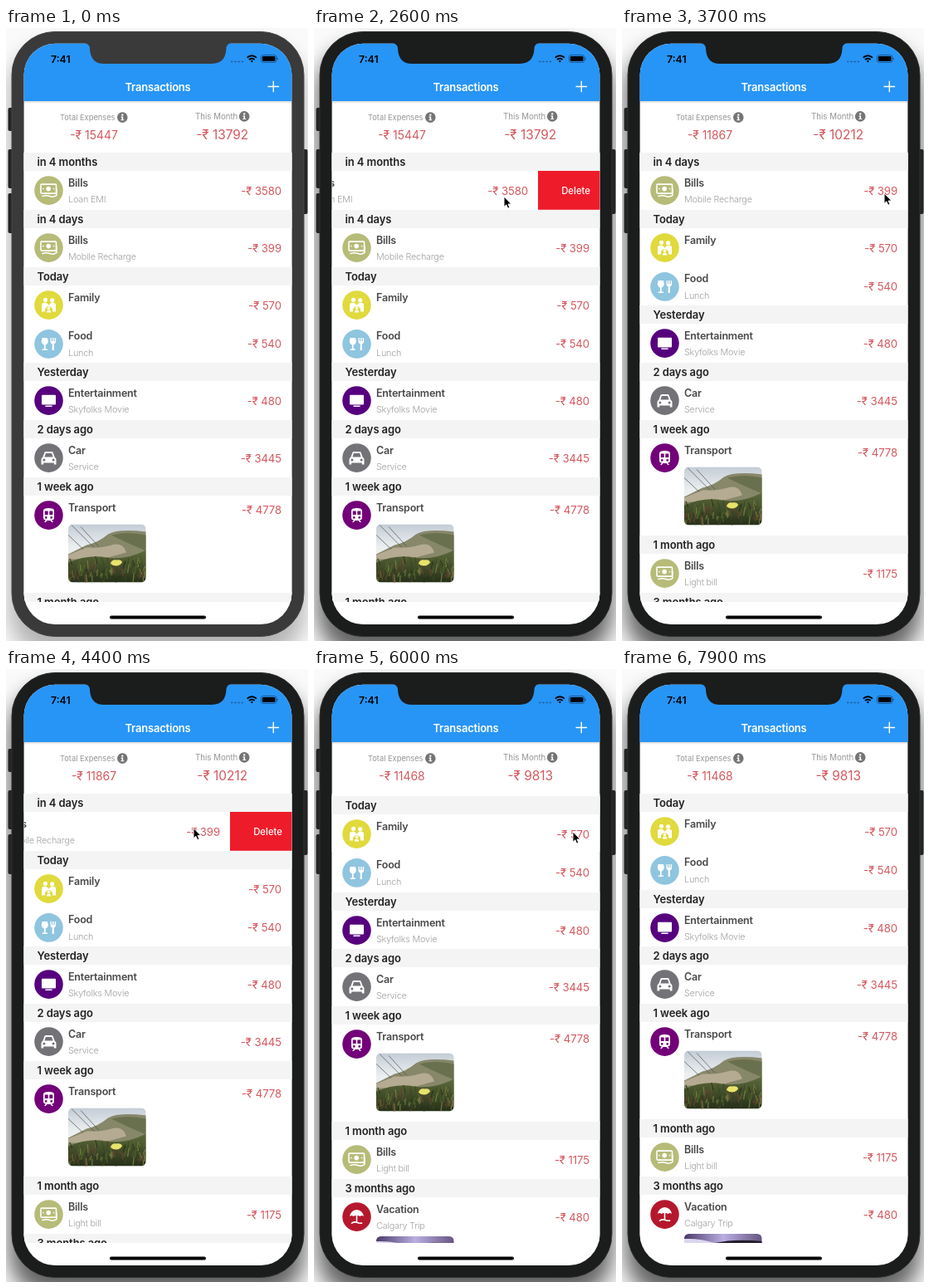
Recreate the animation shown at these times as an HTML page. Size 364x738 px, loop 8000 ms.

```html
<!DOCTYPE html>
<html lang="en">
<head>
<meta charset="utf-8">
<title>Transactions</title>
<style>
  html, body { margin: 0; width: 100%; height: 100%; overflow: hidden; background: #fafafa; }
  svg { display: block; width: 364px; height: 738px; font-family: Inter, Roboto, sans-serif; }
  .head { font-size: 13px; font-weight: 600; letter-spacing: -.1px; fill: #222; }
  .title { font-size: 12.5px; font-weight: 600; letter-spacing: -.2px; fill: #484848; }
  .sub { font-size: 10.8px; font-weight: 300; letter-spacing: -.2px; fill: #a0a0a0; }
  .amount { font-size: 13.2px; letter-spacing: -.1px; fill: #d4585f; text-anchor: end; }
  .total { fill: #d4585f; text-anchor: middle; }
  .label { fill: #959595; }
  .line { fill: none; stroke: #fff; stroke-width: 1.6; stroke-linecap: round; stroke-linejoin: round; }
</style>
</head>
<body>
<svg viewBox="0 0 364 738">
  <defs>
    <filter id="blur" x="-20%" y="-20%" width="140%" height="140%"><feGaussianBlur stdDeviation="13"/></filter>
    <clipPath id="listClip"><rect x="21" y="150" width="324" height="541"/></clipPath>
    <clipPath id="screenClip"><rect x="21.6" y="18.800" width="322.800" height="699.200" rx="37.500"/></clipPath>
    <clipPath id="photoClip"><rect width="93.5" height="70" rx="5.5"/></clipPath>
    <linearGradient id="sky" x2="0" y2="1"><stop stop-color="#c3ccd6"/><stop offset=".4" stop-color="#eceff0"/></linearGradient>
    <linearGradient id="grass" x2="0" y2="1"><stop stop-color="#5d6a3a"/><stop offset="1" stop-color="#27301a"/></linearGradient>
    <linearGradient id="dusk"><stop stop-color="#4a3a68"/><stop offset=".5" stop-color="#b9aee2"/><stop offset="1" stop-color="#66557f"/></linearGradient>
    <linearGradient id="edge" x2="0" y2="1"><stop stop-color="#000" stop-opacity=".16"/><stop offset="1" stop-color="#000" stop-opacity="0"/></linearGradient>
  </defs>

  <rect width="364" height="738" fill="#fafafa"/>
  <rect id="shadow" x="4" y="22" width="356" height="736" rx="54" filter="url(#blur)"/>
  <g fill="#242424">
    <rect x="2.5" y="96" width="8" height="28" rx="2"/>
    <rect x="2.5" y="146" width="8" height="47" rx="2"/>
    <rect x="2.5" y="199" width="8" height="48" rx="2"/>
    <rect x="355" y="146" width="8.5" height="78" rx="2"/>
  </g>
  <rect id="body" x="7" y="4.500" width="352" height="728" rx="52" stroke-width="1"/>

  <g clip-path="url(#screenClip)">
    <rect x="21" y="18" width="324" height="701" fill="#fff"/>
    <g id="list" clip-path="url(#listClip)"></g>
    <rect x="21" y="88" width="324" height="3" fill="url(#edge)"/>
    <rect x="21" y="18" width="324" height="70" fill="#2795f6"/>
    <text x="183" y="75.6" text-anchor="middle" font-size="13" font-weight="600" letter-spacing="-.2" fill="#fff">Transactions</text>
    <path d="M315.5 70.5h13.6M322.3 63.7v13.6" stroke="#fff" stroke-width="1.4"/>

    <text x="54" y="41.6" font-size="12.3" font-weight="600">7:41</text>
    <path d="M271 40.5h15" stroke="#1c5f9d" stroke-width="1.6" stroke-dasharray="2.4 1.8"/>
    <path d="M290.7 35.6q5.6-4.800 11.2 0M292.9 38.1q3.4-2.800 6.800 0" fill="none" stroke="#000" stroke-width="1.9"/>
    <path d="M294.7 39.6q1.6-1.1 3.2 0l-1.6 1.8z"/>
    <rect x="307.5" y="32.6" width="18.4" height="8.8" rx="2.5" fill="none" stroke="#174f84" stroke-width=".9"/>
    <rect x="308.9" y="34" width="15.6" height="6" rx="1.3"/>
    <path d="M326.8 35.4q1.5 1.6 0 3.2z"/>

    <text class="label" x="65" y="110.6" font-size="9.3">Total Expenses</text>
    <text class="label" x="228" y="109.7" font-size="9.7">This Month</text>
    <g id="infos"></g>
    <text id="total" class="total" x="106" y="134.4" font-size="13.9"></text>
    <text id="month" class="total" x="260.7" y="134.2" font-size="15.4"></text>
    <rect x="125" y="707.4" width="116" height="4" rx="2"/>
  </g>
  <path id="notch" d="M95 18H271Q265.5 19.5 265.5 25Q264.5 43 248 43H118Q102 43 101 25Q101 19.5 95 18Z"/>
  <path id="cursor" d="M0 0V12.4L2.8 9.8L4.7 14.2L6.9 13.2L5 9H8.9Z" fill="#000" stroke="#fff" stroke-width="1" stroke-linejoin="round"/>
</svg>

<script>
const LOOP = 8000, LEFT = 21, WIDTH = 323, RIGHT = LEFT + WIDTH, TOP = 150;
const HEAD = 22, ROW = 46.8, SECTION = HEAD + ROW, SWIPE = 74;
const $ = id => document.getElementById(id);

const icons = {
  bills: ['#b6bb78', `<g class="line"><rect x="-9.5" y="-7.500" width="18.5" height="11" rx="1"/>
    <path d="M-7.5 6.800q5-1.4 9 .2t8-1.2V-2"/></g><circle cx="-.3" cy="-2" r="2.8" fill="#fff"/>
    <path class="line" d="M-6.6-2h.1M6-2h.1"/>`],
  family: ['#e0da3d', `<g fill="#fff"><circle cx="-4" cy="-6.3" r="2.6"/><circle cx="4.2" cy="-5.800" r="2.6"/>
    <path d="M-8.5 8V0q0-2.8 3-2.8h2.7L0 .2l2.8-3h2.7q3 0 3 2.8V8h-4V4.5L2 1.8H-2L-4.5 4.5V8z"/>
    <circle cy="3.8" r="1.7"/><path d="M-2.6 9q0-3 2.6-3t2.6 3z"/></g>`],
  food: ['#8fc5df', `<path d="M-7.800-7.500h6.200q2 5.500-.6 7.500-1 .8-1.600.9V6h2.200v1.600h-6.200V6h2.200V.9q-.6-.1-1.600-.9-2.600-2-.6-7.500z" fill="#fff"/>
    <path d="M2-7.500v4q0 3 2.200 3.300V7.600h2.200V-.2q2.200-.3 2.200-3.300v-4H7.200v4H6v-4H4.600v4H3.400v-4z" fill="#fff"/>`],
  tv: ['#57007e', `<rect x="-8.5" y="-6.800" width="17" height="11.600" rx="1" fill="#fff"/><path class="line" d="M-3.500 6.600h7"/>`],
  car: ['#727277', `<path d="M-7.200-.8L-5.200-6.300Q-4.800-7.500-3.500-7.500h7Q4.800-7.500 5.200-6.300L7.200-.8Q9 .2 9 2V7.800H6.300V5.800H-6.300V7.800H-9V2Q-9 .2-7.200-.8z" fill="#fff"/>
    <path d="M-5.100-1L-3.600-5.500h7.200L5.100-1z" fill="#727277"/>
    <circle cx="-5.600" cy="2.500" r="1.500" fill="#727277"/><circle cx="5.600" cy="2.500" r="1.500" fill="#727277"/>`],
  train: ['#730079', `<path d="M-6.500-5.500q0-3 6.500-3t6.500 3v8.500q0 3-3 3l2 2.500H3.700L2 6.500h-4L-3.700 8.500h-1.800L-3.500 6q-3 0-3-3z" fill="#fff"/>
    <path d="M-4.800-5h4v4.300h-4zM.8-5h4v4.300h-4z" fill="#730079"/>
    <circle cx="-3.2" cy="2.800" r="1.300" fill="#730079"/><circle cx="3.2" cy="2.800" r="1.300" fill="#730079"/>`],
  beach: ['#b5182d', `<path d="M-8.500-.5Q-7-8 0-8.500Q7-8 8.500-.5Q6-2.500 4-.5Q0-3-4-.5Q-6-2.5-8.5-.5z" fill="#fff"/>
    <path class="line" d="M0-2V6M-6 7.500q3-2 6-.8t6 .8"/>`]
};

function random(seed) {
  return () => (seed = seed * 16807 % 2147483647) / 2147483647;
}

function meadow() {
  const rnd = random(77), shades = ['#2a341b', '#55692f', '#7f8548', '#6e4434', '#394a22'];
  let blades = '';
  for (let i = 0; i < 110; i++) {
    const x = rnd() * 94, y = 47 + rnd() * 26;
    blades += `<path d="M${x.toFixed(1)} ${y.toFixed(1)}l${(rnd() * 6 - 3).toFixed(1)} ${(-4 - rnd() * 7).toFixed(1)}" stroke="${shades[i % 5]}"/>`;
  }
  return `<rect width="94" height="70" fill="url(#sky)"/>
    <path d="M0 36L22 25Q36 22 48 12Q60 5 94 9V60H0z" fill="#87876a"/>
    <path d="M0 37L22 28Q38 29 52 25T70 34L40 42H0z" fill="#b5ab92"/>
    <path d="M52 13Q70 8 94 13V32Q74 24 52 13z" fill="#69704d"/>
    <path d="M0 46Q24 36 46 40T94 31V70H0z" fill="url(#grass)"/>
    <g stroke-width="1.3" opacity=".8">${blades}</g>
    <path d="M4 1L31 28M15 3L37 27M0 13L18 30" fill="none" stroke="#4b5053" stroke-width=".7"/>
    <path d="M51 47q2-5 7-4q6-1 7 3q-3 4-7 4q-5 0-7-3z" fill="#e8e36c"/>`;
}

const photos = {
  meadow: meadow(),
  dusk: `<rect width="94" height="70" fill="url(#dusk)"/><path d="M0 6Q20 5 40 12V70H0z" fill="#dcd6ee"/>
    <path d="M30 13Q55 5 94 9V70H30z" fill="#231d2c"/>`
};

const remover = `<g class="remover"><rect class="red" y="0" height="${ROW}" fill="#ee1c2b"/>
  <text x="315.6" y="27.5" text-anchor="middle" font-size="11.4" font-weight="500" fill="#fff">Delete</text></g>`;

// row: icon, title, note, amount, photo, height, photo top, amount baseline
const sections = [
  ['in 4 months', ['bills', 'Bills', 'Loan EMI', 3580]],
  ['in 4 days', ['bills', 'Bills', 'Mobile Recharge', 399]],
  ['Today', ['family', 'Family', '', 570], ['food', 'Food', 'Lunch', 540]],
  ['Yesterday', ['tv', 'Entertainment', 'Skyfolks Movie', 480]],
  ['2 days ago', ['car', 'Car', 'Service', 3445]],
  ['1 week ago', ['train', 'Transport', '', 4778, 'meadow', 117, 34.4, 22.4]],
  ['1 month ago', ['bills', 'Bills', 'Light bill', 1175]],
  ['3 months ago', ['beach', 'Vacation', 'Calgary Trip', 480, 'dusk', 130, 47, 28.6]]
];

function rowMarkup([icon, title, note, amount, photo, , photoY, amountY = 28.6], y) {
  const [color, glyph] = icons[icon];
  return `<g class="row" transform="translate(0 ${y})">
    <g class="content">
      <g transform="translate(51.5 23.6)"><circle r="17.3" fill="${color}"/>${glyph}</g>
      <text class="title" x="75" y="18.5">${title}</text>
      <text class="sub" x="75" y="38.3">${note}</text>
      <text class="amount" x="332" y="${amountY}">-₹ ${amount}</text>
      ${photo ? `<g transform="translate(75 ${photoY})" clip-path="url(#photoClip)">${photos[photo]}</g>` : ''}
    </g>${remover}</g>`;
}

let nextY = TOP;
const views = sections.map(([name, ...rows]) => {
  const base = nextY;
  let y = HEAD, body = '';
  for (const row of rows) {
    body += rowMarkup(row, y);
    y += row[5] || ROW;
  }
  nextY += y;
  const el = document.createElementNS('http://www.w3.org/2000/svg', 'g');
  el.innerHTML = `<rect x="${LEFT}" width="${WIDTH + 1}" height="${y + 1}" fill="#fff"/>${body}
    <g class="top"><rect x="${LEFT}" width="${WIDTH + 1}" height="${HEAD}" fill="#f4f4f4"/>
    <text class="head" x="37.5" y="16">${name}</text></g>`;
  $('list').append(el);
  const part = c => el.querySelector('.' + c);
  el.querySelectorAll('.remover').forEach(r => r.setAttribute('display', 'none'));
  return { el, base, top: part('top'), content: part('content'), remover: part('remover'), red: part('red') };
});

$('infos').innerHTML = [[140.3, 107.6], [287.2, 106.4]].map(([x, y]) =>
  `<g transform="translate(${x} ${y})"><circle r="6.3" fill="#747474"/>
   <path d="M-1.7-1H.9V2.6H2V3.7H-1.9V2.6H-.8V.1H-1.7z" fill="#fff"/><circle cy="-3" r="1.2" fill="#fff"/></g>`).join('');

const clamp = u => Math.max(0, Math.min(1, u));
const span = (t, a, b) => clamp((t - a) / (b - a));
const smooth = u => u * u * (3 - 2 * u);
const easeOut = u => 1 - (1 - u) ** 3;

const deletions = [
  { drag: [2150, 2500], start: 3308 },
  { drag: [4150, 4400], start: 5745 }
];
const FOCUS = 2150;

// time, x, y
const path = [
  [600, 368, 420], [1000, 322, 300], [1700, 303, 203], [2150, 303, 203], [2500, 229, 203],
  [2650, 229, 203], [3150, 317, 199.5], [3650, 317, 199.5], [4000, 300, 191.5], [4150, 300, 191.5],
  [4400, 226, 191.5], [4650, 226, 191.5], [5200, 300, 195], [5600, 312, 196], [6100, 312, 196], [6450, 372, 180]
];

function pointer(t) {
  const i = path.findIndex(p => p[0] > t);
  if (i < 1) return i ? path[path.length - 1] : path[0];
  const a = path[i - 1], b = path[i], u = smooth(span(t, a[0], b[0]));
  return a.map((v, k) => v + (b[k] - v) * u);
}

const move = (el, x, y) => el.setAttribute('transform', `translate(${x.toFixed(2)} ${y.toFixed(2)})`);

function draw(t) {
  const gone = deletions.map(d => easeOut(span(t, d.start, d.start + 395)));

  views.forEach((v, i) => {
    const lift = (i > 0 ? gone[0] : 0) + (i > 1 ? gone[1] : 0);
    move(v.el, 0, Math.round(v.base - lift * SECTION));
  });
  deletions.forEach((d, i) => {
    const v = views[i], p = gone[i];
    const shift = SWIPE * smooth(span(t, ...d.drag)) * (1 - span(p, .262, .642));
    move(v.content, -shift, 0);
    move(v.top, p * WIDTH, 0);
    v.red.setAttribute('x', RIGHT - shift);
    v.red.setAttribute('width', shift + 1);
    v.remover.setAttribute('display', shift > 0 ? 'inline' : 'none');
    v.top.setAttribute('opacity', 1 - p);
    v.content.setAttribute('opacity', 1 - p);
    v.el.setAttribute('display', p < 1 ? 'inline' : 'none');
  });

  const spent = (gone[0] > 0 ? 3580 : 0) + (gone[1] > 0 ? 399 : 0);
  $('total').textContent = '-₹ ' + (15447 - spent);
  $('month').textContent = '-₹ ' + (13792 - spent);

  const active = t >= FOCUS, shell = active ? '#1b1c1c' : '#3a3a3a';
  $('body').setAttribute('fill', shell);
  $('body').setAttribute('stroke', active ? '#303131' : '#484848');
  $('notch').setAttribute('fill', shell);
  $('shadow').setAttribute('opacity', active ? .6 : .28);

  const [, x, y] = pointer(t);
  move($('cursor'), x, y);
}

const begin = performance.now();
function tick() {
  draw((performance.now() - begin) % LOOP);
  requestAnimationFrame(tick);
}
tick();
</script>
</body>
</html>
```
